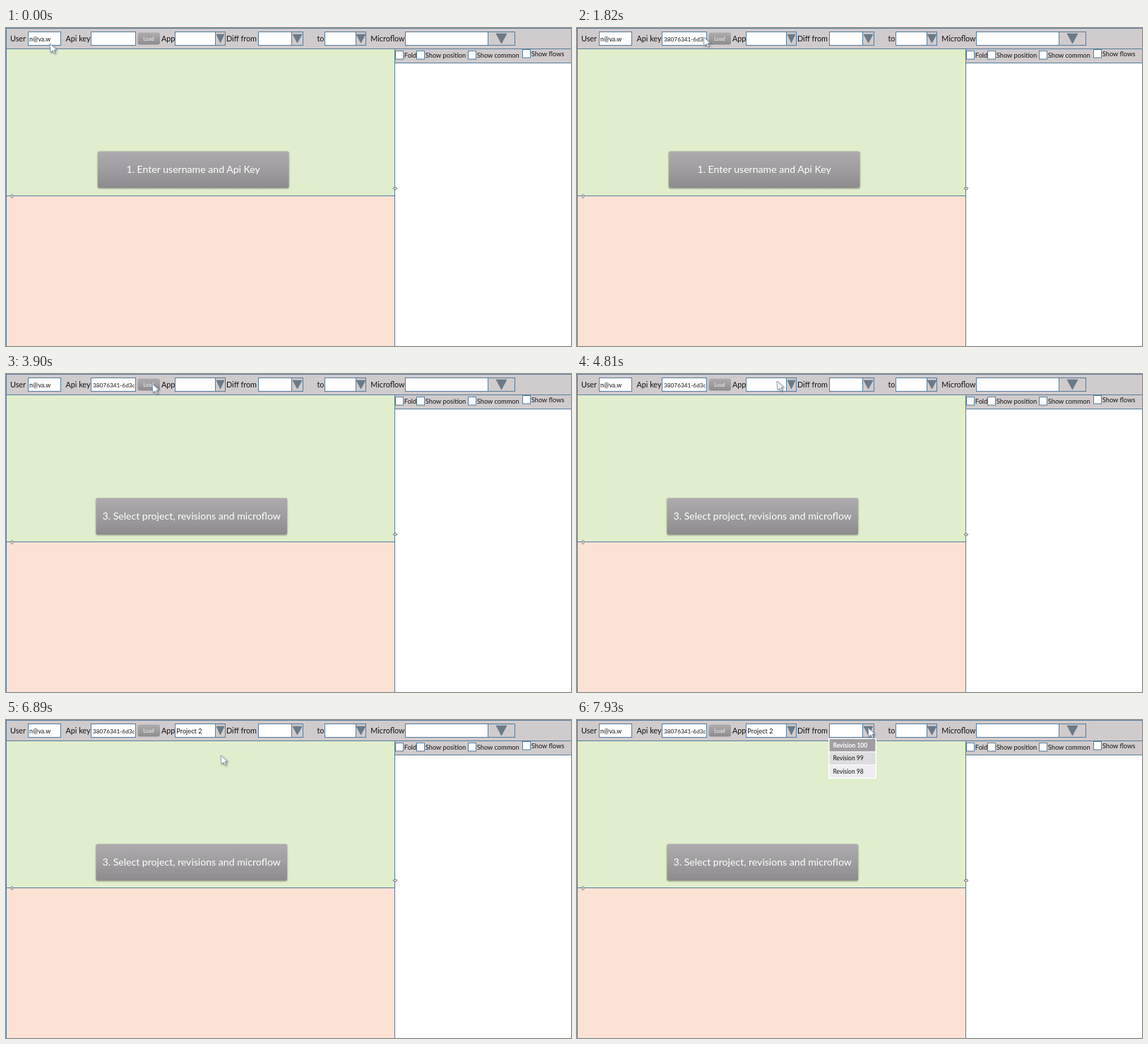
Write an HTML page that moves like this. It is 800x450 px and loops after 8000 ms.

```html
<!DOCTYPE html>
<html lang="en">
<head>
<meta charset="utf-8">
<title>Microflow diff walkthrough</title>
<style>
  html, body { margin: 0; width: 100%; height: 100%; overflow: hidden; background: #fff; }
  svg { display: block; width: 100%; height: 100%; }
  text { font-family: Lato, Roboto, sans-serif; fill: #141414; }
  .box { fill: #fff; stroke: #557d9c; }
  .bar { fill: #d0cbcd; }
  .line { stroke: #557d9c; fill: none; }
  .caption text { fill: #fff; font-size: 14.1px; text-anchor: middle; }
</style>
</head>
<body>
<svg id="stage" viewBox="0 0 800 450">
  <defs>
    <linearGradient id="plate" x2="0" y2="1">
      <stop offset="0" stop-color="#adabad"/>
      <stop offset=".5" stop-color="#9f9d9f"/>
      <stop offset="1" stop-color="#8d8b8d"/>
    </linearGradient>
    <filter id="soft" x="-10%" y="-20%" width="120%" height="150%">
      <feDropShadow dx="0" dy="1" stdDeviation="1" flood-color="#333" flood-opacity=".55"/>
    </filter>
    <filter id="pointerShadow" x="-50%" y="-50%" width="220%" height="220%">
      <feDropShadow dx="1.2" dy="1.2" stdDeviation=".8" flood-color="#333" flood-opacity=".5"/>
    </filter>
  </defs>
</svg>
<script>
const LOOP = 8000, STEP = 130;
const stage = document.getElementById('stage');

function add(tag, attrs, parent = stage) {
  const node = document.createElementNS('http://www.w3.org/2000/svg', tag);
  for (const key in attrs) node.setAttribute(key, attrs[key]);
  parent.append(node);
  return node;
}
const rect = (x, y, width, height, attrs, parent) =>
  add('rect', { x, y, width, height, ...attrs }, parent);

function label(x, y, size, content, parent, attrs) {
  const node = add('text', { x, y, 'font-size': size, ...attrs }, parent);
  node.textContent = content;
  return node;
}
const field = (left, right) => rect(left + .5, 5.5, right - left - 1, 19, { class: 'box' });

function dropdown(left, split, right, halfWidth, top, bottom) {
  field(left, right);
  rect(split + .5, 5.5, right - split - 1, 19, { class: 'bar line', style: 'fill:#d0cbcd' });
  const mid = (split + right) / 2;
  add('path', {
    d: `M${mid - halfWidth} ${top}H${mid + halfWidth}L${mid} ${bottom}Z`,
    fill: '#6b7a86', stroke: '#557086', 'stroke-width': .6
  });
}

function menu(x, width, items) {
  const group = add('g', {});
  rect(x, 26, width, 57, { fill: '#fff' }, group);
  items.forEach((item, i) => {
    const top = 27 + i * 18.6;
    rect(x + 1.5, top, width - 3, 17.4, { fill: ['#a19ea1', '#dddcde', '#efedf0'][i] }, group);
    label(x + 6.5, top + 11.6, 8.5, item, group,
      i ? {} : { 'font-weight': 700, style: 'fill:#fff' });
  });
  return group;
}

function caption(x, y, content) {
  const group = add('g', { class: 'caption' });
  rect(x, y, 270.5, 51.5, { rx: 2, fill: 'url(#plate)', filter: 'url(#soft)' }, group);
  label(x + 135.2, y + 30, 14.1, content, group);
  return group;
}

// Panes
rect(0, 0, 800, 30, { class: 'bar' });
rect(551, 30, 249, 19, { class: 'bar' });
rect(0, 30, 551, 208, { fill: '#e0eecd' });
rect(0, 238, 551, 212, { fill: '#fce2d4' });
add('path', { class: 'line', d: 'M0 .5H800M0 29.5H800M.5 0V450M550.5 30V450M0 237.5H551M551 49.5H800' });
add('ellipse', { cx: 8.5, cy: 238, rx: 1.5, ry: 2.8, fill: '#ddd', stroke: '#777', 'stroke-width': .8 });
add('ellipse', { cx: 551, cy: 227, rx: 2.8, ry: 1.5, fill: '#ddd', stroke: '#667', 'stroke-width': .8 });

// Toolbar
[[6, 'User'], [84.5, 'Api key'], [220, 'App'], [312, 'Diff from'], [440.5, 'to'], [516.3, 'Microflow']]
  .forEach(([x, name]) => label(x, 18.7, 10.8, name));
field(31, 78);
field(120, 184);
dropdown(239, 296, 311, 5.5, 9, 21);
dropdown(357, 404, 421, 6.5, 9, 21);
dropdown(451, 495, 510, 6.5, 9, 21);
dropdown(565, 682, 721, 7.5, 8, 22);
label(33, 18.5, 8.9, 'n@va.w');
const key = label(123, 18.7, 8.25, '38076341-6d3c');
rect(186.5, 6.5, 31.5, 17, { rx: 3, fill: 'url(#plate)' });
label(202, 17.6, 7.4, 'Load', stage, { 'text-anchor': 'middle', style: 'fill:#f4f4f4' });
const choice = label(241.3, 19, 9.2, 'Project 2');

[[551, 33, 'Fold'], [581, 33, 'Show position'], [654, 33, 'Show common'], [731, 31, 'Show flows']]
  .forEach(([x, y, name]) => {
    rect(x + .5, y - .5, 11, 11.5, { class: 'box' });
    label(x + 12.8, y + 9, 9.25, name);
  });

const captionOne = caption(130, 174.5, '1. Enter username and Api Key');
const captionTwo = caption(129.5, 175.5, '2. Load application list. Wait a bit ...');
const captionThree = caption(127.5, 175.5, '3. Select project, revisions and microflow');
const projects = menu(239.5, 102, ['Project 1', 'Project 2', 'Project 3']);
const revisions = menu(356, 68, ['Revision 100', 'Revision 99', 'Revision 98']);
const pointer = add('path', {
  d: 'M0 0L1 12.5L4 10L6.2 14L7.9 13.2L5.9 9.2L9.6 8.6Z',
  fill: '#fafcff', stroke: '#7b92a8', 'stroke-width': .9, filter: 'url(#pointerShadow)'
});

// Each part with its visible spans in ms
const spans = [
  [captionOne, 0, 2210], [captionTwo, 2210, 3900], [captionThree, 3900, LOOP],
  [key, 1300, LOOP], [choice, 6500, LOOP],
  [projects, 5200, 6500], [revisions, 7800, LOOP],
  [pointer, 0, 2600, 3900, LOOP]
];
// Pointer path: time, x, y
const path = [
  [0, 62, 22], [910, 128, 13], [1300, 131, 12], [2080, 203, 13], [3900, 207, 14],
  [4810, 283, 10], [5200, 299, 9.5], [5460, 299, 10], [5850, 293, 24],
  [6240, 289, 47], [6630, 291, 49], [6890, 304, 50], [7670, 410, 12], [7930, 412, 11]
];

function pointerAt(t) {
  const next = path.findIndex(p => p[0] > t);
  if (next < 0) return path[path.length - 1].slice(1);
  const a = path[next - 1], b = path[next], k = (t - a[0]) / (b[0] - a[0]);
  return [1, 2].map(i => a[i] + (b[i] - a[i]) * k);
}

function draw(now) {
  const t = Math.floor(now % LOOP / STEP) * STEP;
  for (const [node, from, to, again = LOOP, end = LOOP] of spans) {
    const shown = t >= from && t < to || t >= again && t < end;
    node.setAttribute('visibility', shown ? 'visible' : 'hidden');
  }
  pointer.setAttribute('transform', `translate(${pointerAt(t)})`);
}

const start = performance.now();
function tick() {
  draw(performance.now() - start);
  requestAnimationFrame(tick);
}
tick();
</script>
</body>
</html>
```
